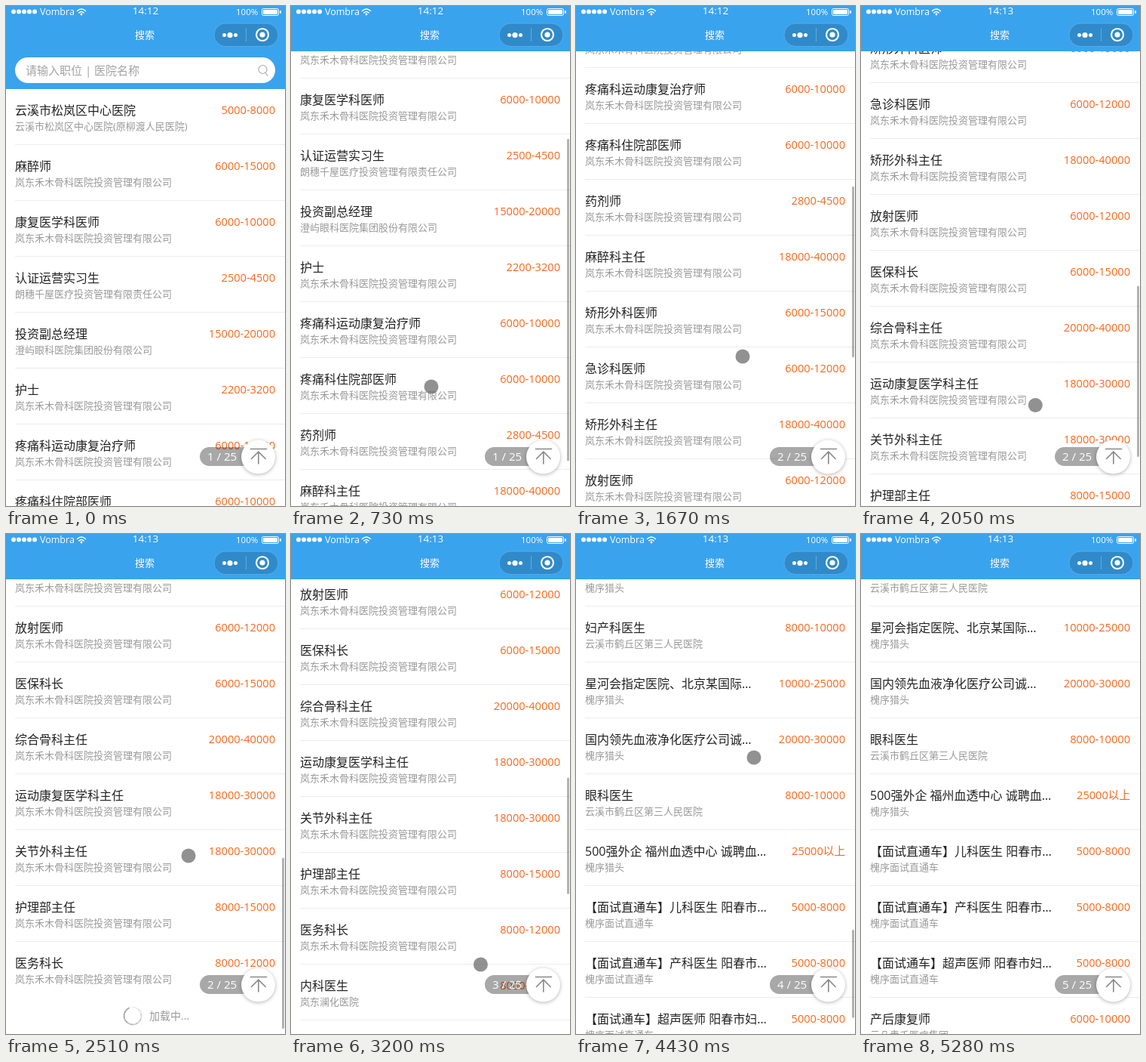
An HTML page for the animation above (5980 ms loop, 370 px wide and 662 px high).

```html
<!DOCTYPE html>
<html lang="zh-CN">
<head>
<meta charset="utf-8">
<title>搜索</title>
<style>
  html, body { margin: 0; width: 100%; height: 100%; overflow: hidden; background: #fff; }
  svg { display: block; width: 370px; height: 662px; font-family: "Open Sans", "Noto Sans CJK SC", "Noto Sans CJK", sans-serif; }
  .title { font-size: 16px; fill: #222; }
  .firm { font-size: 13px; fill: #999; }
  .pay { font-size: 14.6px; fill: #f8661a; text-anchor: end; }
  .line { fill: none; stroke-linecap: round; }
</style>
</head>
<body>
<svg viewBox="0 0 370 662">
  <rect width="370" height="662" fill="#fff"/>
  <g id="list">
    <rect y="59" width="370" height="51" fill="#3aa3ee"/>
    <rect x="12" y="68" width="345" height="34" rx="17" fill="#fff"/>
    <text x="26" y="90.7" font-size="15" fill="#a2a2a2">请输入职位 | 医院名称</text>
    <g class="line" stroke="#aaa" stroke-width="1.2">
      <circle cx="340.5" cy="84" r="5.5"/><path d="M344 88.5l3 4"/>
    </g>
    <g id="rows"></g>
    <g id="loader">
      <g id="spinner" class="line" stroke="#999" stroke-width="1.8"></g>
      <text x="190" y="5" font-size="14" fill="#999">加载中...</text>
    </g>
  </g>
  <rect id="bar" x="366" width="3" rx="1.5" fill="#000" fill-opacity=".3"/>

  <rect width="370" height="60" fill="#3aa3ee"/>
  <g fill="#fff">
    <g id="signal"></g>
    <text x="45" y="11.5" font-size="12.5">Vombra</text>
    <g class="line" stroke="#fff" stroke-width="1.5">
      <path d="M94.5 6.5q5.5-5 11 0M96.8 9q3.2-3 6.4 0"/>
    </g>
    <circle cx="100" cy="11" r="1.4"/>
    <text id="clock" x="185" y="11" font-size="13.5" text-anchor="middle"></text>
    <text x="305" y="12" font-size="11.5">100%</text>
    <rect x="339.5" y="3.5" width="22" height="9" rx="2" fill="none" stroke="#fff"/>
    <rect x="341" y="5" width="19" height="6" rx="1"/>
    <rect x="363" y="6" width="2" height="4" rx="1"/>
    <text x="184" y="43" font-size="13" text-anchor="middle">搜索</text>
    <rect x="276" y="23" width="85" height="30.5" rx="15.2" fill="#308ac9" stroke="#64b0e6" stroke-width=".8"/>
    <circle cx="289.5" cy="38.5" r="2.5"/><circle cx="297" cy="38.5" r="3.6"/><circle cx="304.5" cy="38.5" r="2.5"/>
    <rect x="318" y="29" width="1" height="18" fill="#68abd9"/>
    <circle cx="340" cy="38" r="8" fill="none" stroke="#fff" stroke-width="2.2"/><circle cx="340" cy="38" r="3.6"/>
  </g>

  <rect x="257" y="584" width="75" height="25" rx="12.5" fill="#000" fill-opacity=".34"/>
  <text id="page" x="267" y="602" font-size="15" fill="#fff"></text>
  <circle cx="334.5" cy="597" r="22.5" fill="#fff" style="filter:drop-shadow(0 1px 2.5px rgba(0,0,0,.3))"/>
  <path class="line" stroke="#888" stroke-width="1.6" d="M324.5 586.5h21M325.5 599.5l9.3-9.3 9.3 9.3M334.8 590.5v15.5"/>
  <circle id="cursor" r="9.5" fill="#666" fill-opacity=".72"/>
</svg>
<script>
const LOOP = 5980, ROW = 74, HEADER = 60, VIEW = 602;
const bone = '岚东禾木骨科医院投资管理有限公司';
const hunter = '槐序猎头';
const fair = '槐序面试直通车';
const district = '云溪市鹤丘区第三人民医院';

// title | pay | employer (the bone hospital when left out)
const jobs = `云溪市松岚区中心医院|5000-8000|云溪市松岚区中心医院(原柳渡人民医院)
麻醉师|6000-15000
康复医学科医师|6000-10000
认证运营实习生|2500-4500|朗穗千屋医疗投资管理有限责任公司
投资副总经理|15000-20000|澄屿眼科医院集团股份有限公司
护士|2200-3200
疼痛科运动康复治疗师|6000-10000
疼痛科住院部医师|6000-10000
药剂师|2800-4500
麻醉科主任|18000-40000
矫形外科医师|6000-15000
急诊科医师|6000-12000
矫形外科主任|18000-40000
放射医师|6000-12000
医保科长|6000-15000
综合骨科主任|20000-40000
运动康复医学科主任|18000-30000
关节外科主任|18000-30000
护理部主任|8000-15000
医务科长|8000-12000
内科医生|8000-10000|岚东澜化医院
外科医生|8000-10000|岚东澜化医院
ICU医生|8000-10000|岚东澜化医院
护士|2000-3000|云溪市柏川区妇女儿童保健中心
医学翻译|10000-15000|穗远健康产业有限公司
上海城区某三级专科医院诚聘…|15000-20000|${hunter}
无锡三级综合医院 诚聘医院副院…|25000以上|${hunter}
药剂士/师|5000-8000|云溪朗慈医院（云溪首家中外合资医院）
南通某二级甲等公立医院诚聘…|10000-15000|${hunter}
上海某二甲公立医院诚聘超声…|10000-15000|${hunter}
三级综合医院诚聘内科主任|15000-20000|${hunter}
二级专科医院诚聘骨科主任|15000-20000|${hunter}
妇产科医生|8000-10000|${district}
星河会指定医院、北京某国际…|10000-25000|${hunter}
国内领先血液净化医疗公司诚…|20000-30000|${hunter}
眼科医生|8000-10000|${district}
500强外企 福州血透中心 诚聘血…|25000以上|${hunter}
【面试直通车】儿科医生 阳春市…|5000-8000|${fair}
【面试直通车】产科医生 阳春市…|5000-8000|${fair}
【面试通车】超声医师 阳春市妇…|5000-8000|${fair}
产后康复师|6000-10000|云朵青禾医疗集团`.split('\n').map(line => line.split('|'));

const $ = id => document.getElementById(id);
const repeat = (n, draw) => Array.from({ length: n }, (_, i) => draw(i)).join('');

$('signal').innerHTML = repeat(5, i => `<circle cx="${10 + 7 * i}" cy="7.5" r="3"/>`);
$('spinner').innerHTML = repeat(10, i =>
  `<path d="M0-11.5A11.5 11.5 0 0 1 6.76-9.3" transform="rotate(${36 * i})" opacity="${.1 + .09 * i}"/>`);
$('rows').innerHTML = jobs.map(([title, pay, firm = bone], i) => `
  <g transform="translate(0 ${110 + ROW * i})">
    ${i ? '<rect x="12" y="-1" width="358" height="1" fill="#ececec"/>' : ''}
    <text class="title" x="12" y="34">${title}</text>
    <text class="firm" x="12" y="54">${firm}</text>
    <text class="pay" x="357" y="33.2">${pay}</text>
  </g>`).join('');
const rows = [...$('rows').children];

// Tables are [step, value, ...]; step 0 is the start of the first swipe
const scrollKeys = [[-1, 0], [0, 28], [1, 92], [2, 162], [3, 236], [11, 236], [12, 290], [13, 376],
  [14, 472], [15, 575], [17, 735], [19, 822], [21, 848], [23, 860], [24, 912], [25, 976], [33, 976],
  [34, 1020], [35, 1130], [36, 1310], [37, 1510], [38, 1676], [39, 1716], [47, 1716], [48, 2012],
  [49, 2232], [50, 2382], [51, 2456]];
const cursorKeys = [[-5, 290, 690], [-4, 270, 652], [-3, 183, 630], [-2, 183, 621], [-1, 183, 615],
  [0, 184, 590], [1, 185, 550], [2, 186, 504], [3, 187, 455], [7, 205, 612], [11, 205, 612],
  [12, 212, 570], [14, 221, 464], [15, 225, 420], [22, 236, 610], [23, 238, 570], [25, 242, 426],
  [26, 243, 385], [33, 250, 610], [35, 253, 530], [38, 255, 395], [39, 254, 355], [46, 246, 610],
  [47, 244, 560], [50, 236, 296], [51, 234, 311], [59, 187, 590], [60, 187, 643], [61, 187, 690]];
const barKeys = [[-1, 0], [0, 1], [5, 1], [7, 0], [11, 0], [12, 1], [28, 1], [30, 0], [33, 0],
  [34, 1], [42, 1], [44, 0], [47, 0], [48, 1], [54, 1], [56, 0]];
const pageLoads = [8, 30, 44, 56];
const introTimes = [0, 70, 120, 270, 350];

function stepAt(t) {
  if (t < 572) return introTimes.filter(start => start <= t).length - 6;
  return Math.min(61, Math.floor((t - 572) / 77.05));
}

function sample(keys, step) {
  const next = keys.findIndex(key => key[0] > step);
  if (next < 0) return keys[keys.length - 1].slice(1);
  if (next === 0) return keys[0].slice(1);
  const a = keys[next - 1], b = keys[next];
  const u = (step - a[0]) / (b[0] - a[0]);
  return a.slice(1).map((v, i) => v + (b[i + 1] - v) * u);
}

function render(now) {
  const t = now % LOOP, step = stepAt(t);
  const [scroll] = sample(scrollKeys, step);
  const [x, y] = sample(cursorKeys, step);
  const page = 1 + pageLoads.filter(load => load <= step).length;
  const count = page * 10, height = count * ROW + 98;
  const track = VIEW - 8, top = HEADER + 1 + track * scroll / height;

  $('list').setAttribute('transform', `translate(0 ${-Math.round(scroll)})`);
  rows.forEach((row, i) => { row.style.display = i < count ? '' : 'none'; });
  $('loader').setAttribute('transform', `translate(0 ${134 + ROW * count - 20 + 0})`);
  $('loader').setAttribute('transform', `translate(0 ${134 + ROW * count})`);
  $('spinner').setAttribute('transform', `translate(168 0) rotate(${Math.max(0, step) * 27.7 % 360})`);
  $('bar').setAttribute('y', top);
  $('bar').setAttribute('height', track * VIEW / height);
  $('bar').setAttribute('opacity', sample(barKeys, step)[0]);
  $('cursor').setAttribute('cx', x);
  $('cursor').setAttribute('cy', y);
  $('page').textContent = `${page} / 25`;
  $('clock').textContent = step < 17 ? '14:12' : '14:13';
}

const start = performance.now();
function tick() {
  render(performance.now() - start);
  requestAnimationFrame(tick);
}
tick();
</script>
</body>
</html>
```
